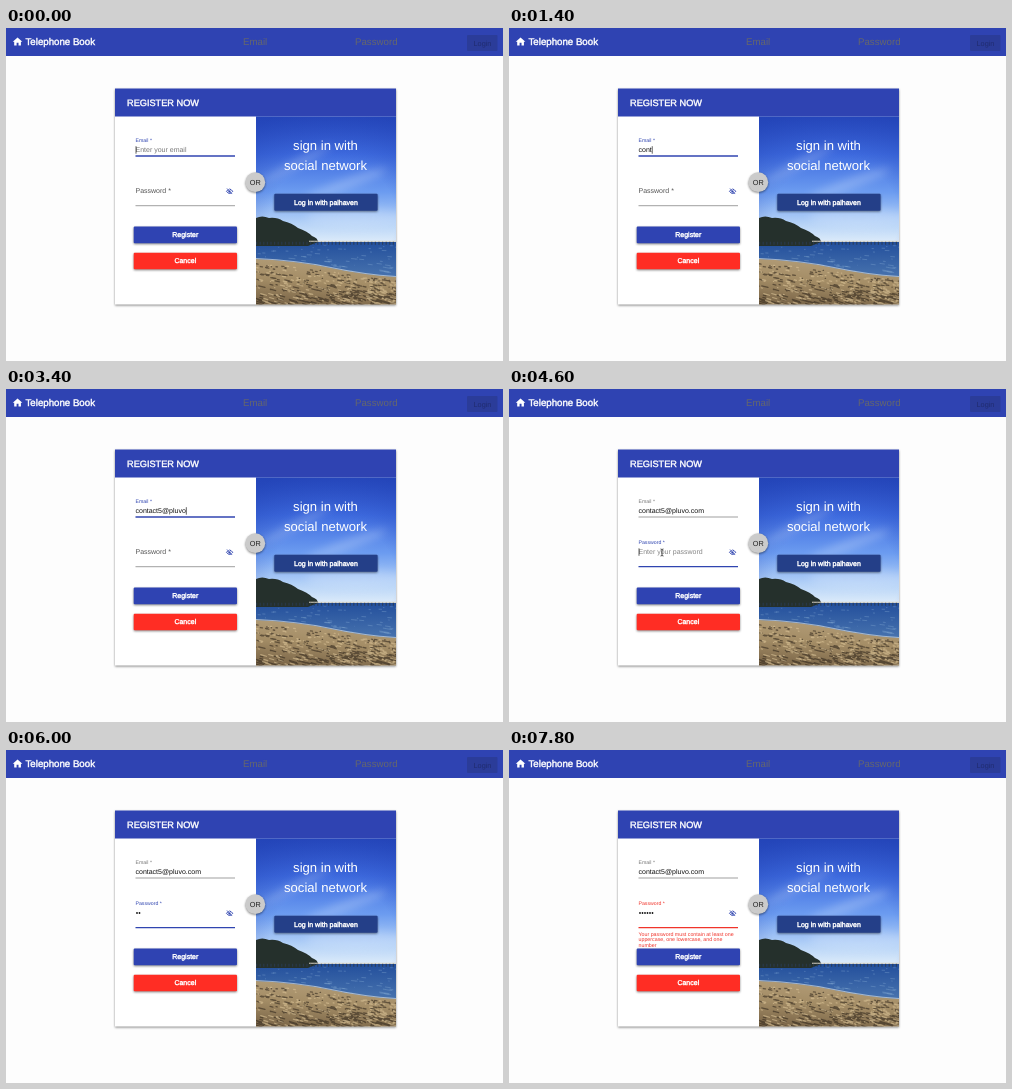
An HTML page for the animation above (8 s loop, 497 by 333 pixels).

```html
<!DOCTYPE html>
<html lang="en">
<head>
<meta charset="utf-8">
<title>Telephone Book</title>
<style>
html, body { margin: 0; width: 100%; height: 100%; overflow: hidden; background: #fdfdfd; }
svg { display: block; width: 100vw; height: 100vh; }
text { font-family: "Liberation Sans", Arial, sans-serif; font-size: 7px; text-rendering: geometricPrecision; }
.mid { text-anchor: middle; }
.white { fill: #fff; }
.bold { stroke: #fff; stroke-width: .4px; }
.nav { font-size: 9.7px; }
.big { font-size: 13.1px; }
.error text { font-size: 5.3px; fill: #f0342b; }
.raised { filter: drop-shadow(0 1px 1px #0007); }
</style>
</head>
<body>
<svg viewBox="0 0 497 333">
  <defs>
    <linearGradient id="sky" x2="0" y2="1">
      <stop offset="0" stop-color="#2a4cc2"/>
      <stop offset=".3" stop-color="#3f6ce0"/>
      <stop offset=".6" stop-color="#6c9cf0"/>
      <stop offset=".85" stop-color="#b6d3f7"/>
      <stop offset="1" stop-color="#dfedfa"/>
    </linearGradient>
    <linearGradient id="sea" x2="0" y2="1">
      <stop offset="0" stop-color="#234f9c"/>
      <stop offset="1" stop-color="#5580b4"/>
    </linearGradient>
    <linearGradient id="sand" x1=".6" x2=".4" y2="1">
      <stop offset="0" stop-color="#b39d78"/>
      <stop offset=".5" stop-color="#a48d66"/>
      <stop offset="1" stop-color="#7d684a"/>
    </linearGradient>
    <radialGradient id="corner" cx=".55" cy=".8" r=".9">
      <stop offset=".5" stop-color="#1c3cae" stop-opacity="0"/>
      <stop offset="1" stop-color="#1c3cae" stop-opacity=".5"/>
    </radialGradient>
    <filter id="soft" x="-50%" y="-50%" width="200%" height="200%"><feGaussianBlur stdDeviation="4"/></filter>
    <clipPath id="photo"><path d="M250 88.500H390V276.500H250z"/></clipPath>
  </defs>

  <path d="M0 0H497V28H0z" fill="#2f43b2"/>
  <path transform="translate(5.800 8) scale(.48)" class="white" d="M10 20v-6h4v6h5v-8h3L12 3 2 12h3v8z"/>
  <text x="19.500" y="17.200" class="nav white bold">Telephone Book</text>
  <g fill="#66676c">
    <text x="237" y="17" class="nav">Email</text>
    <text x="349" y="17" class="nav">Password</text>
  </g>
  <rect x="461" y="7" width="30.500" height="16" rx="1" fill="#2b3c99"/>
  <text x="476.500" y="17.700" class="mid" fill="#202c70" style="font-size:7.300px">Login</text>

  <path class="raised" d="M109 60.500H390V276.500H109z" fill="#fff"/>
  <path d="M109 60.500H390V88.500H109z" fill="#2f43b2"/>
  <text x="121" y="78.200" class="white bold" style="font-size:9.200px">REGISTER NOW</text>

  <g clip-path="url(#photo)">
    <path d="M250 88H390V215H250z" fill="url(#sky)"/>
    <g fill="#e4efff" filter="url(#soft)" opacity=".28">
      <ellipse cx="290" cy="136" rx="40" ry="4" transform="rotate(-28 290 136)"/>
      <ellipse cx="340" cy="156" rx="44" ry="5" transform="rotate(-20 340 156)"/>
      <ellipse cx="350" cy="190" rx="50" ry="9"/>
    </g>
    <path d="M250 88H390V215H250z" fill="url(#corner)"/>
    <path d="M250 214H390V262H250z" fill="url(#sea)"/>
    <path id="waves" fill="none" stroke="#8eb2d6" stroke-width=".6" opacity=".55"/>
    <path d="M250 190Q256 187 263 190Q271 189 277 193Q286 195 292 200Q301 203 306 208Q312 210 312 214L302 218H250z" fill="#25302c"/>
    <path d="M303 213.300H390" stroke="#d9d3c6" stroke-width="1.100"/>
    <path d="M250 215.300H390" stroke="#2a3a50" stroke-width="3" stroke-dasharray="1.200 2.400" opacity=".8"/>
    <path d="M250 231Q292 233 325 240T390 249V277H250z" fill="url(#sand)"/>
    <path d="M250 230.500Q292 232.500 325 239.500T390 248.500" fill="none" stroke="#cfd8de" stroke-width="1.200" opacity=".7"/>
    <path id="dunes" fill="none" stroke="#352a1e" stroke-width="1.300" stroke-linecap="round" opacity=".6"/>
    <path id="glints" fill="none" stroke="#dcc598" stroke-width="1.200" stroke-linecap="round" opacity=".6"/>
  </g>
  <text x="319.500" y="122" class="mid big white">sign in with</text>
  <text x="319.500" y="141.500" class="mid big white">social network</text>
  <rect x="268.300" y="165.700" width="103.300" height="17" rx="1" fill="#243f88" class="raised"/>
  <text x="320" y="176.600" class="mid white bold">Log in with palhaven</text>
  <circle cx="249.300" cy="154.200" r="9.900" fill="#cbcbcb" class="raised"/>
  <text x="249.300" y="156.800" class="mid" fill="#222" style="font-size:7.300px">OR</text>

  <text id="mailLabel" x="129.500" y="113.700" style="font-size:5.200px">Email *</text>
  <text id="mail" x="129.500" y="124.200"></text>
  <path id="mailLine"/>
  <text id="passLabel" x="129.500">Password *</text>
  <text id="passHint" x="129.500" y="165.300" fill="#858585">Enter your password</text>
  <g id="dots" fill="#111"></g>
  <path id="passLine"/>
  <g fill="none" stroke="#3045b0" transform="translate(223.600 163.300) scale(.88)">
    <path d="M-3.500 0Q0 -5 3.500 0Q0 5 -3.500 0z" stroke-width="1.100"/>
    <circle r="1" fill="#3045b0"/>
    <path d="M-2.200 -3.600L3.500 2.200" stroke="#fff"/>
    <path d="M-3 -3.200L2.900 3.100" stroke-width=".9"/>
  </g>
  <g id="error" class="error">
    <text x="129.500" y="185.600">Your password must contain at least one</text>
    <text x="129.500" y="191.300">uppercase, one lowercase, and one</text>
    <text x="129.500" y="197">number</text>
  </g>
  <path id="caret" stroke="#222" stroke-width=".7"/>

  <rect x="127.700" y="198.600" width="103.300" height="16.600" rx="1" fill="#2f43b2" class="raised"/>
  <text x="179.300" y="209.200" class="mid white bold">Register</text>
  <rect x="127.700" y="224.700" width="103.300" height="16.600" rx="1" fill="#ff2d24" class="raised"/>
  <text x="179.300" y="235.300" class="mid white bold">Cancel</text>
  <path id="pointer" d="M-1.500 -3.500Q0 -3.500 0 -2.500Q0 -3.500 1.500 -3.500M0 -2.500V2.500M-1.500 3.500Q0 3.500 0 2.500Q0 3.500 1.500 3.500" fill="none" stroke="#222" stroke-width=".8"/>
</svg>
<script>
const $ = id => document.getElementById(id);
const LOOP = 8000, FOCUS = 4300, ERROR = 7320;
const BLUE = '#3045b0', GREY = '#777', RED = '#f0342b';
const ADDRESS = 'contact5@pluvo.com';
const mailKeys = [950, 1100, 1250, 1350, 1500, 1620, 1740, 1850, 2500,
  2650, 2800, 2950, 3100, 3300, 3500, 3650, 3780, 3900];
const passKeys = [5250, 5450, 6150, 6500, 6900, 7300];

let seed = 7;
const rand = () => (seed = seed * 16807 % 2147483647) / 2147483647;

// Short strokes below a sloping shore, longer towards the viewer.
function scatter(id, count, top, bottom, slope, length) {
  let d = '';
  for (let i = 0; i < count; i++) {
    const x = 248 + rand() * 142;
    const shore = top + slope * (x - 250);
    const depth = rand();
    const w = length * (.4 + depth) * rand();
    d += `M${x} ${shore + depth * (bottom - shore)}l${w} ${w * (slope + depth * .2)}`;
  }
  $(id).setAttribute('d', d);
}
scatter('waves', 90, 217, 246, 0, 8);
scatter('dunes', 270, 234, 277, .13, 7);
scatter('glints', 200, 234, 277, .13, 5);

const clamp = v => Math.max(0, Math.min(1, v));
const ease = v => 1 - (1 - clamp(v)) ** 3;
const show = (el, on) => el.setAttribute('visibility', on ? 'visible' : 'hidden');

function underline(id, y, focused, color) {
  const line = $(id);
  line.setAttribute('d', `M129.500 ${y}H229`);
  line.setAttribute('stroke', color);
  line.setAttribute('stroke-width', focused ? 1.3 : .7);
}

function draw(t) {
  const focused = t >= FOCUS, wrong = t >= ERROR;
  const typed = mailKeys.filter(k => k <= t);
  const hidden = passKeys.filter(k => k <= t);
  const passColor = wrong ? RED : focused ? BLUE : '#555';

  $('mail').textContent = typed.length ? ADDRESS.slice(0, typed.length) : 'Enter your email';
  $('mail').setAttribute('fill', typed.length ? '#111' : '#777');
  $('mailLabel').setAttribute('fill', focused ? GREY : BLUE);
  underline('mailLine', 128, !focused, focused ? GREY : BLUE);

  const lift = ease((t - FOCUS) / 250);
  const label = $('passLabel');
  label.setAttribute('y', 165.3 - 10.1 * lift);
  label.style.fontSize = 7 - 1.8 * lift + 'px';
  label.setAttribute('fill', passColor);
  underline('passLine', 177.7, focused, focused ? passColor : GREY);
  show($('passHint'), t > FOCUS + 150 && !hidden.length);
  $('dots').innerHTML = hidden.map((_, i) =>
    `<circle cx="${131 + i * 2.5}" cy="163" r=".9"/>`).join('');
  show($('error'), wrong);

  const keys = focused ? [FOCUS, ...hidden] : [0, ...typed];
  const width = focused ? hidden.length * 2.5
    : typed.length ? $('mail').getComputedTextLength() : 0;
  $('caret').setAttribute('d', `M${130 + width} ${focused ? 159.3 : 118.2}v7.500`);
  show($('caret'), (t - keys.at(-1)) % 1000 < 500);

  const move = ease((t - 4050) / 250);
  $('pointer').setAttribute('transform', `translate(${160 - 7 * move} ${150 + 13.5 * move})`);
  show($('pointer'), t > 4050 && t < passKeys[0]);
}

const start = performance.now();
function tick() {
  draw((performance.now() - start) % LOOP);
  requestAnimationFrame(tick);
}
tick();
</script>
</body>
</html>
```
